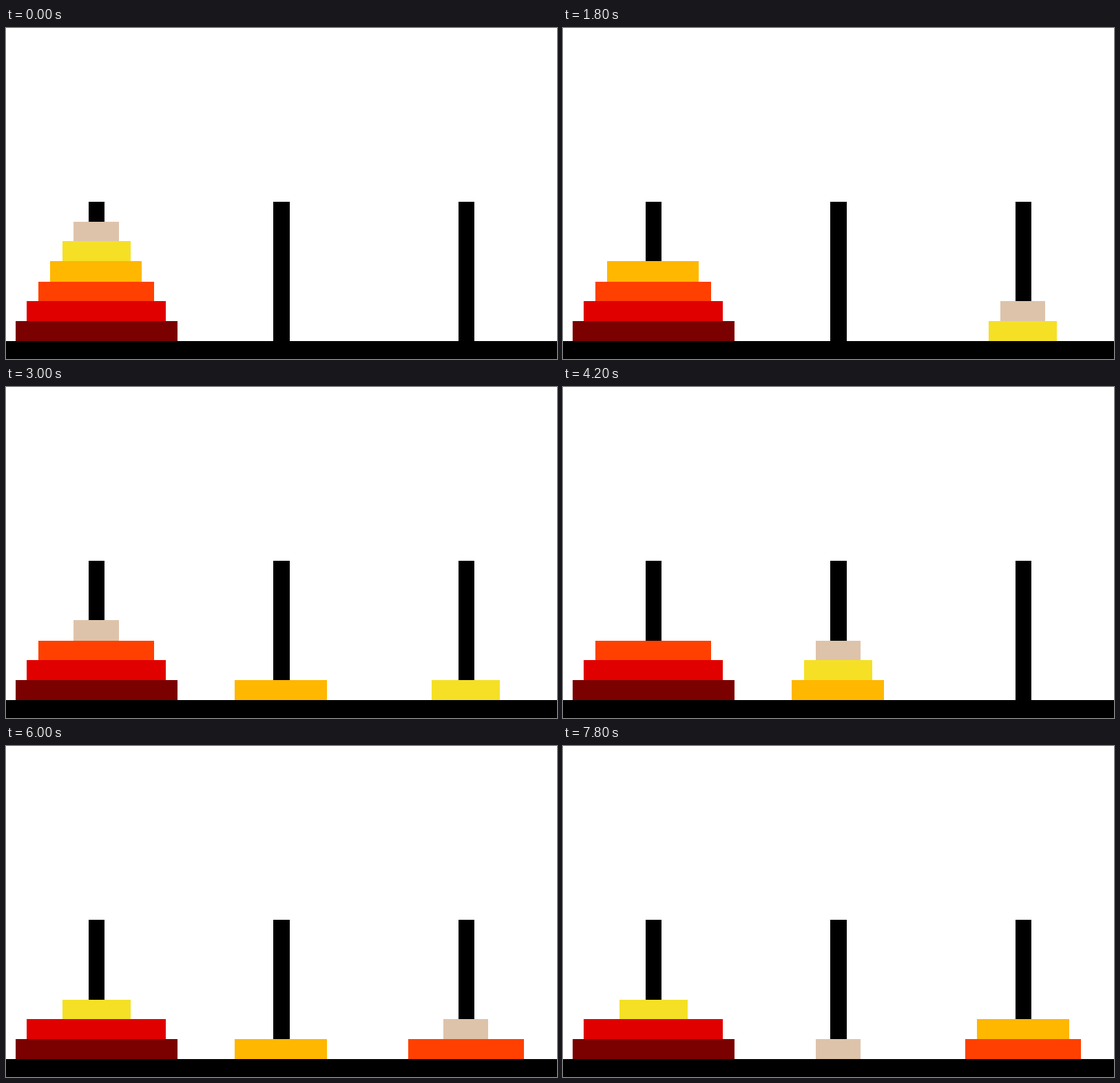
These frames come from a looping animation (800 by 480 pixels, 8000 ms). An HTML page with a canvas:

```html
<!DOCTYPE html>
<html lang="en">
<head>
<meta charset="utf-8">
<title>Tower of Hanoi</title>
<style>
html, body { margin: 0; width: 100%; height: 100%; overflow: hidden; background: #fff; }
canvas { display: block; }
</style>
</head>
<body>
<canvas width="800" height="480"></canvas>
<script>
const ctx = document.querySelector('canvas').getContext('2d');
const LOOP = 8000, STEP = 600;

// Left and right edge of each peg, and the disc boundaries from the base up
const pegs = [[120, 143], [388, 412], [657, 680]];
const levels = [454, 425, 396, 368, 338, 309, 281];

// Smallest disc first; one [left, right] pair for each peg it visits
const discs = [
  { color: '#dec3ab', spans: [[98, 164], [367, 432], [635, 700]] },
  { color: '#f5e025', spans: [[82, 181], [350, 449], [618, 717]] },
  { color: '#ffb700', spans: [[64, 197], [332, 466], [601, 735]] },
  { color: '#ff4000', spans: [[47, 215], [316, 483], [584, 752]] },
  { color: '#e00000', spans: [[30, 232]] },
  { color: '#7b0000', spans: [[14, 249]] }
];

function box(color, [left, right], top, bottom) {
  ctx.fillStyle = color;
  ctx.fillRect(left, top, right - left, bottom - top);
}

// Disc k moves every 2^(k+1) steps; even discs go right, odd ones left, cyclically
function pegOf(k, step) {
  const moves = Math.floor((step + 2 ** k) / 2 ** (k + 1));
  return moves * (k % 2 ? 2 : 1) % 3;
}

function draw(time) {
  const step = Math.floor(time % LOOP / STEP);
  box('#fff', [0, 800], 0, 480);
  box('#000', [0, 800], 454, 480);
  for (const peg of pegs) box('#000', peg, 252, 454);

  const heights = [0, 0, 0];
  for (let k = discs.length - 1; k >= 0; k--) {
    const peg = pegOf(k, step), level = heights[peg]++;
    box(discs[k].color, discs[k].spans[peg], levels[level + 1], levels[level]);
  }
}

function tick() {
  draw(performance.now());
  requestAnimationFrame(tick);
}
tick();
</script>
</body>
</html>
```
